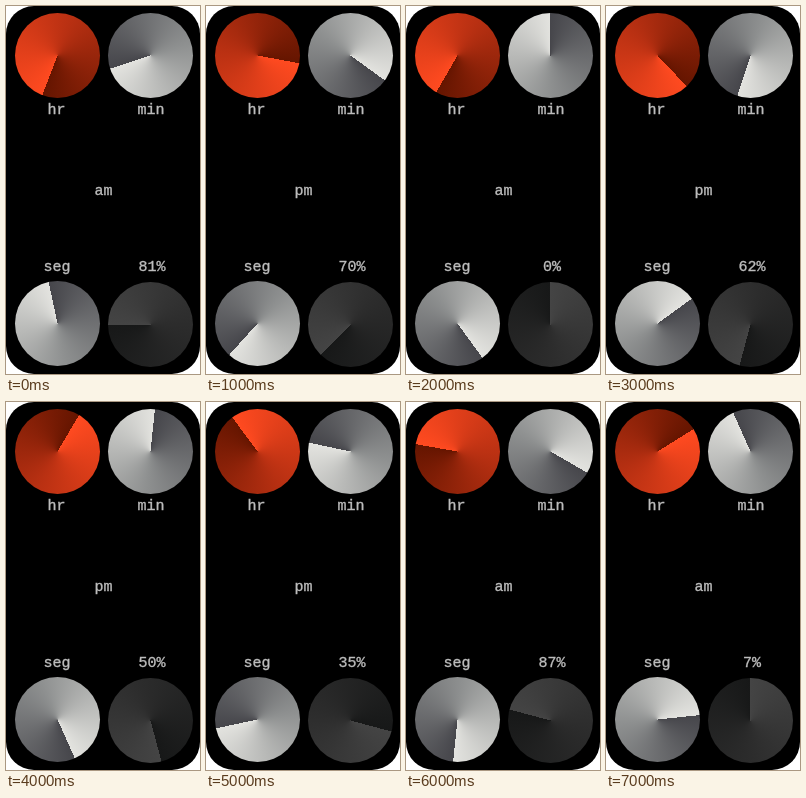
An HTML page that plays this animation: 194x368 px, repeating every 8 s.

```html
<!DOCTYPE html>
<html lang="en">
<head>
<meta charset="utf-8">
<title>Dial clock</title>
<style>
  html, body { margin: 0; width: 100%; height: 100%; overflow: hidden; background: #fff; }
  #face {
    position: relative; width: 194px; height: 368px; overflow: hidden;
    background: #000; border-radius: 28px;
  }
  .dial { position: absolute; width: 85px; height: 85px; border-radius: 50%; }
  .label {
    position: absolute; width: 80px; margin-left: -40px; text-align: center;
    font: 15px/18px "Liberation Mono", monospace; color: #bdbdbd; white-space: pre;
    -webkit-text-stroke: 0.35px #bdbdbd;
  }
</style>
</head>
<body>
<div id="face"></div>
<script>
const face = document.getElementById('face');
const STEP = 1000;

// hour (24 h), minute, second, charge in percent
const readings = [
  [6, 42, 58, 81],
  [15, 21, 37, 70],
  [7, 0, 24, 0],
  [16, 33, 9, 62],
  [13, 1, 26, 50],
  [22, 47, 43, 35],
  [9, 20, 31, 87],
  [1, 56, 14, 7]
];

function add(cls, x, y, text = '') {
  const el = document.createElement('div');
  el.className = cls;
  el.style.left = x + 'px';
  el.style.top = y + 'px';
  el.textContent = text;
  face.append(el);
  return el;
}

function dial(cx, cy, ...colors) {
  const el = add('dial', cx - 42.5, cy - 42.5);
  return deg => {
    el.style.background = `conic-gradient(from ${deg}deg, ${colors})`;
  };
}

const grey = ['#46464b', '#8e9090', '#e3e3df'];
const hour = dial(51.5, 49.5, '#ff4a20', '#b83012', '#651500');
const minute = dial(144.5, 49.5, ...grey);
const second = dial(51.5, 317.5, ...grey);
const charge = dial(144.5, 318.5, '#444444', '#2c2c2c', '#171818');

add('label', 50.5, 96, 'hr');
add('label', 145, 96, 'min');
add('label', 51, 253, 'seg');
const half = add('label', 97.5, 177);
const percent = add('label', 146, 253);

function show([h, m, s, p]) {
  hour((h % 12) * 30 + m / 2);
  minute(m * 6);
  second(s * 6);
  // the charge dial moves in 24 notches
  charge(15 * Math.max(0, Math.floor(p * 0.24) - 1));
  half.textContent = h < 12 ? 'am' : 'pm';
  percent.textContent = p + '%';
}

let shown = -1;
function tick() {
  const i = Math.floor(performance.now() / STEP) % readings.length;
  if (i !== shown) show(readings[shown = i]);
  requestAnimationFrame(tick);
}
tick();
</script>
</body>
</html>
```
